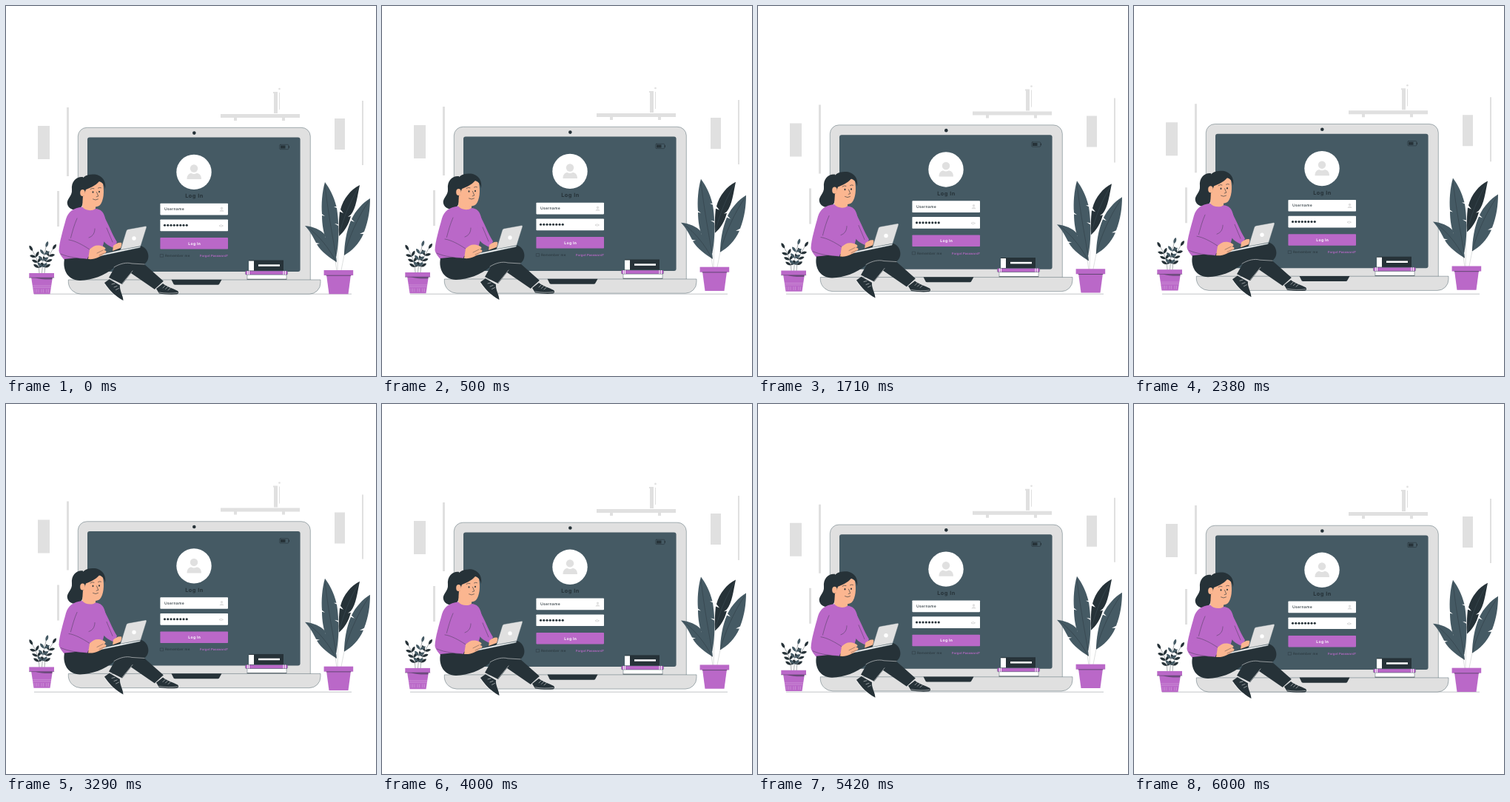
These frames come from a looping animation (500 px wide and 500 px high, 6040 ms). An HTML page:

```html
<!DOCTYPE html>
<html lang="en">
<head>
<meta charset="utf-8">
<title>Log in</title>
<style>
  html, body { margin: 0; width: 100%; height: 100%; overflow: hidden; background: #fff; }
  svg { display: block; width: 100%; height: 100%; }
  text { font-family: Inter, "Open Sans", sans-serif; text-rendering: geometricPrecision; }
  .light { fill: #e0e0e0; }
  .slate { fill: #455a64; }
  .dark { fill: #263238; }
  .accent { fill: #ba68c8; }
  .white { fill: #fff; }
  .skin { fill: #fbb690; }
  .line, .thin, .pale { fill: none; stroke: #263238; stroke-width: .6; stroke-linecap: round; stroke-linejoin: round; }
  .thin { stroke-width: .4; }
  .pale { stroke: #fff; stroke-width: .5; }
  .edge { stroke: #455a64; stroke-width: .45; }
</style>
</head>
<body>
<svg viewBox="0 0 500 500">
  <path d="M38 389.200H467" stroke="#b4b8ba" stroke-width=".8"/>

  <g id="scene">
    <g class="light">
      <path d="M43 162h16v45h-16zM82 137h3v93h-3zM69 250h3v48h-3zM444 152h14v42h-14zM481 128h2v87h-2z"/>
      <path d="M290 146h107v5h-107zM308 151h4v4h-4zM373 151h4v4h-4zM362 116h5v29h-5zM361 116h3v2h-3zM369 117h1v23h-1z"/>
      <circle cx="369.5" cy="112" r="1.3"/>
    </g>

    <!-- big laptop -->
    <path class="light edge" d="M97.3 371V176a12 12 0 0 1 12-11.7H399a12 12 0 0 1 12.3 11.7V371z"/>
    <rect class="slate" x="110" y="177.600" width="287.600" height="181.500" rx="3"/>
    <circle class="dark" cx="254.3" cy="171.6" r="2.3"/>
    <path class="light edge" d="M84.3 370H425v4a15 15 0 0 1-15 15.200H101a17 17 0 0 1-16.7-15.200z"/>
    <path class="dark" d="M223.5 369.7h68l-3.5 6.3q-.5 .8-1.6 .8h-58q-1.2 0-1.8-.8z"/>

    <!-- login form -->
    <circle class="white" cx="254" cy="224.400" r="23.7"/>
    <g class="light">
      <circle cx="254" cy="219.500" r="5.2"/>
      <path d="M244.5 234c0-5.500 3-8 6-8q3.500 2 7 0c3.500 0 6.500 2.500 6.500 8z"/>
    </g>
    <text class="dark" x="254.500" y="259.400" font-size="7.300" font-weight="700" letter-spacing=".5" text-anchor="middle">Log In</text>
    <rect class="white" x="208.400" y="266.700" width="91.600" height="15.700" rx=".8"/>
    <rect class="white" x="208.400" y="288.500" width="91.600" height="15.700" rx=".8"/>
    <rect class="accent" x="208.400" y="313" width="91.600" height="15.500" rx=".8"/>
    <text class="dark" x="214" y="276.200" font-size="5" font-weight="500" letter-spacing=".3">Username</text>
    <g id="dots" class="dark"></g>
    <g class="light">
      <circle cx="291.500" cy="273.200" r="1.700"/>
      <path d="M288.500 277.700q.3-2.500 3-2.500t3 2.500z"/>
    </g>
    <path d="M288 297q2.500-2.500 5.500 0q-3 2.500-5.500 0z" fill="none" stroke="#d0d0d0" stroke-width=".8"/>
    <text class="white" x="254.800" y="322.700" font-size="5" font-weight="700" letter-spacing=".35" text-anchor="middle">Log In</text>
    <rect class="thin" x="208.700" y="335.500" width="3.800" height="3.800"/>
    <text class="dark" x="215" y="339" font-size="4.500" letter-spacing=".25">Remember me</text>
    <text class="accent" x="300" y="339" font-size="4.200" font-weight="600" letter-spacing=".1" text-anchor="end">Forgot Password?</text>
    <rect class="line" x="369.800" y="187.300" width="12" height="6.400" rx="1.200"/>
    <path class="dark" d="M371 188.500h6.500v4h-6.500zM382 189.300h1v2.400h-1z"/>

    <!-- books -->
    <rect class="white edge" x="326" y="363" width="53" height="6.200"/>
    <path class="line" d="M326 369.200h53"/>
    <rect class="accent edge" x="323.500" y="358" width="57" height="5" rx="1"/>
    <path d="M326.500 358v5M328.500 358v5M375 358v5M377.500 358v5" stroke="#fff"/>
    <rect class="dark" x="328" y="343.500" width="47" height="14"/>
    <rect class="white" x="328" y="344.500" width="7" height="13"/>
    <rect class="white" x="341" y="349.300" width="29" height="2.500"/>

    <!-- small plant -->
    <g id="sprigs"></g>
    <path class="accent" d="M34 366h29l-3.500 23.300h-22z"/>
    <path class="dark" d="M34.300 367h28.400l-.4 2.500q-14 .5-23-2.200z" opacity=".5"/>
    <rect class="accent" x="31.300" y="361" width="33.700" height="6.200"/>
    <path class="thin" d="M31.500 367.200h33.300"/>
    <path class="pale" d="M36 378h25M36.500 380.300h24M39 383v4M41.500 383v4M44 383v4M48 383v4M50.500 383v4M55 383v4M57.500 383v4" opacity=".45"/>

    <!-- woman -->
    <path class="dark" d="M104 231c-9-1-16 6-15 17c1 9-8 13-6 20c2 7 10 9 16 6c7-4 5-16 8-24z"/>
    <path class="skin" d="M104 256l-1 17c5 6 14 6 18 1v-12z"/>
    <path class="accent" d="M103 271.500c-12 1.500-19 6.500-22 16.500c-4 15-9 31-9.500 43c2 8 7 10 9.500 16c18 2 36-2 52-5l-2-18c3-9 4-18 4-29c0-9-3-15-5-17c-3-3-6-4-9-4c-6 4-14 2-18-2.500z"/>
    <path class="accent" d="M131 282c8 13 12 26 19 37l-4 8c-9-3-14-8-19-16z"/>
    <path class="skin" d="M145 324c4-3 7-5 11-4c1 3-1 8-4 11l-8 1z"/>
    <path class="skin" d="M104 246c-1 10 0 18 5 22.500c5 4.500 14 4 18 .5c5-6 6-18 4-29c-8-7-21-5-27 6z"/>
    <path class="dark" d="M101 256c-4-17 1-28.500 16-28.500c11-.5 19 7.500 17 20c-1-6-4-10-8-10.500c-5 6-13 9-18 11l-3 9z"/>
    <ellipse class="skin" cx="103.500" cy="252.500" rx="3.300" ry="4.500"/>
    <g class="dark">
      <ellipse cx="117.500" cy="251.500" rx=".9" ry="1.200"/>
      <ellipse cx="126" cy="251" rx=".9" ry="1.200"/>
    </g>
    <path class="line" d="M114 247.500q2.500-2 5-.8M124.500 246q2-1.300 4-.3M122.500 251.500l2.300 5.500l-2.600 .8M117.500 261q3.500 2.300 7 0"/>
    <path class="thin" d="M112 313c6-2 8-7 8-12M96 287c-4 9-6 17-9 28M136 300l8 19"/>

    <!-- legs -->
    <path class="dark" d="M79 342c-3 15 5 29 21 29c17-1 32-6 47-18l-8 14l18 9l12-15l32 22l12-11l-26-23c6-5 7-12 3-19c-5-8-18-9-30-5l-32 12z"/>
    <path class="pale" d="M146 353c8-5 17-7 24-5l17 1M171 358l-14 17"/>
    <path class="dark" d="M133 374l7-5l14 8c-1 7 4 13 4.500 21c-10-5-19-14-25.500-24z"/>
    <path class="pale" d="M133.500 376c6 9 14 16.500 23 21.500M140 369l14 8M143 376l4-1M146 380l4-1.500M148.500 383.500l4-2"/>
    <path class="dark" d="M203 382l9-7c6 5 13 6 20 10c2 2 1 4-1 4.500c-8 1-17 0-24-1z"/>
    <path class="pale" d="M207 387c8 1.500 17 1.500 25 .5M201 383l12-11M212 381l3-3M215.500 382.500l3-3M219 384l3-2.500"/>

    <!-- small laptop and hand -->
    <path class="light edge" d="M154.500 330l8-26q.6-2 2.500-2.300l23.500-4.200q2-.3 1.400 1.700l-7.900 25.300z"/>
    <path class="white edge" d="M125 336.500l29.500-6.700l27.500-5l-1 1.800l-54 11.300z"/>
    <circle class="white" cx="173" cy="314" r="2.700"/>
    <path class="accent" d="M84 313c9 1 20 8 30 15l-4 14c-12-1-28-2-38-9z"/>
    <path class="thin" d="M85 316c8 1 19 7 28 13M74 335c11 5 24 6 36 7"/>
    <path class="skin" d="M113 329c5-5 10-7 18-4c5 2 4 4 1 5c3 0 5 2 2 4c-7 5-14 9-23 8z"/>
    <path class="thin" d="M123 334l8-4M126 337l7-3"/>
  </g>

  <!-- tall plant -->
  <g id="plant">
    <path class="thin" d="M444 338l3 20M449 311l-1 46M457 337l-4 20" opacity=".4"/>
    <path class="slate" d="M431 238c-4 14-5 30-4 43l4 3l-4-1c0 12 2 24 6 34c4 9 9 16 13 23c3-15 4-32 3-43l-5-3l5 1c0-7-1-15-2-22l-4-2l3.500 0c-3.500-14-9.500-25-15.500-33z"/>
    <path class="dark" d="M478 242c-12 6-22 18-26 33l4 5l-5-2c-1 10-2 22-1 33c7-6 13-15 16-27l-4 1l4-3c7-8 9-26 12-40z"/>
    <path class="slate" d="M492 260c-10 6-20 17-25 28l4 4l-5-2c-6 14-9 32-9 47c10-6 20-15 26-29l-5 0l6-3c6-15 8-31 8-45z"/>
    <path class="slate" d="M404 297c11 1 21 5 27 12v4l2-2c8 9 13 21 14 35c-10-6-21-14-27-24l4-1l-5-1c-4-8-9-17-15-23z"/>
    <path class="thin" d="M431 242c4 35 10 68 15 96M490 264c-15 22-26 48-33 72M408 299c16 13 28 27 38 47"/>
    <path class="thin" d="M476 246c-12 20-20 41-26 64" style="stroke:#455a64"/>
    <path class="accent" d="M433 363h33l-3.500 26.300h-26z"/>
    <rect class="accent" x="429.600" y="357" width="39.600" height="7"/>
    <path class="line" d="M433 364.200h33"/>
  </g>
</svg>
<script>
  const LOOP = 6040;
  const byId = id => document.getElementById(id);
  const scene = byId("scene"), plant = byId("plant");

  byId("dots").innerHTML = Array.from({ length: 8 }, (_, i) =>
    `<circle cx="${214.5 + i * 4.250}" cy="296.300" r="1.550"/>`).join("");

  // A stem that leaves the pot upright and bends to its tip, with pairs of slim leaves.
  function sprig(x0, x1, y1, pairs, tint) {
    const y0 = 361, midY = (y0 + y1) / 2;
    const leaf = (x, y, turn, size) =>
      `<path class="${tint}" transform="translate(${x} ${y}) rotate(${turn}) scale(${size})"
        d="M0 0C-3-3-2.500-8 0-10C2.500-8 3-3 0 0Z"/>`;
    const at = k => [
      x0 * (1 - k * k) + x1 * k * k,
      y0 * (1 - k) ** 2 + 2 * midY * k * (1 - k) + y1 * k * k,
      Math.atan2(2 * k * (x1 - x0), y0 - y1) * 180 / Math.PI
    ];
    const [tipX, tipY, tipTurn] = at(1);
    let out = `<path class="thin" d="M${x0} ${y0}Q${x0} ${midY} ${x1} ${y1}"/>` + leaf(tipX, tipY, tipTurn, .85);
    for (let i = 0; i < pairs; i++) {
      const [x, y, turn] = at(.24 + .72 * i / pairs);
      out += leaf(x, y, turn - 50, .85) + leaf(x, y, turn + 50, .85);
    }
    return out;
  }
  byId("sprigs").innerHTML =
    sprig(45, 36, 331, 3, "dark") +
    sprig(52, 63, 329, 3, "dark") +
    sprig(48.500, 54, 326, 3, "slate");

  // Triangle wave: 0 at the ends of a period, 1 in its middle.
  const wave = (t, period) => 1 - Math.abs(1 - 2 * (t % period) / period);
  const lift = (node, dy) => node.setAttribute("transform", `translate(0 ${-dy.toFixed(3)})`);

  const start = performance.now();
  function draw(now) {
    const t = Math.max(0, now - start) % LOOP;
    lift(scene, 6.100 * wave(t, LOOP));
    lift(plant, 6.500 * wave(t, LOOP / 4));
    requestAnimationFrame(draw);
  }
  draw(start);
</script>
</body>
</html>
```
